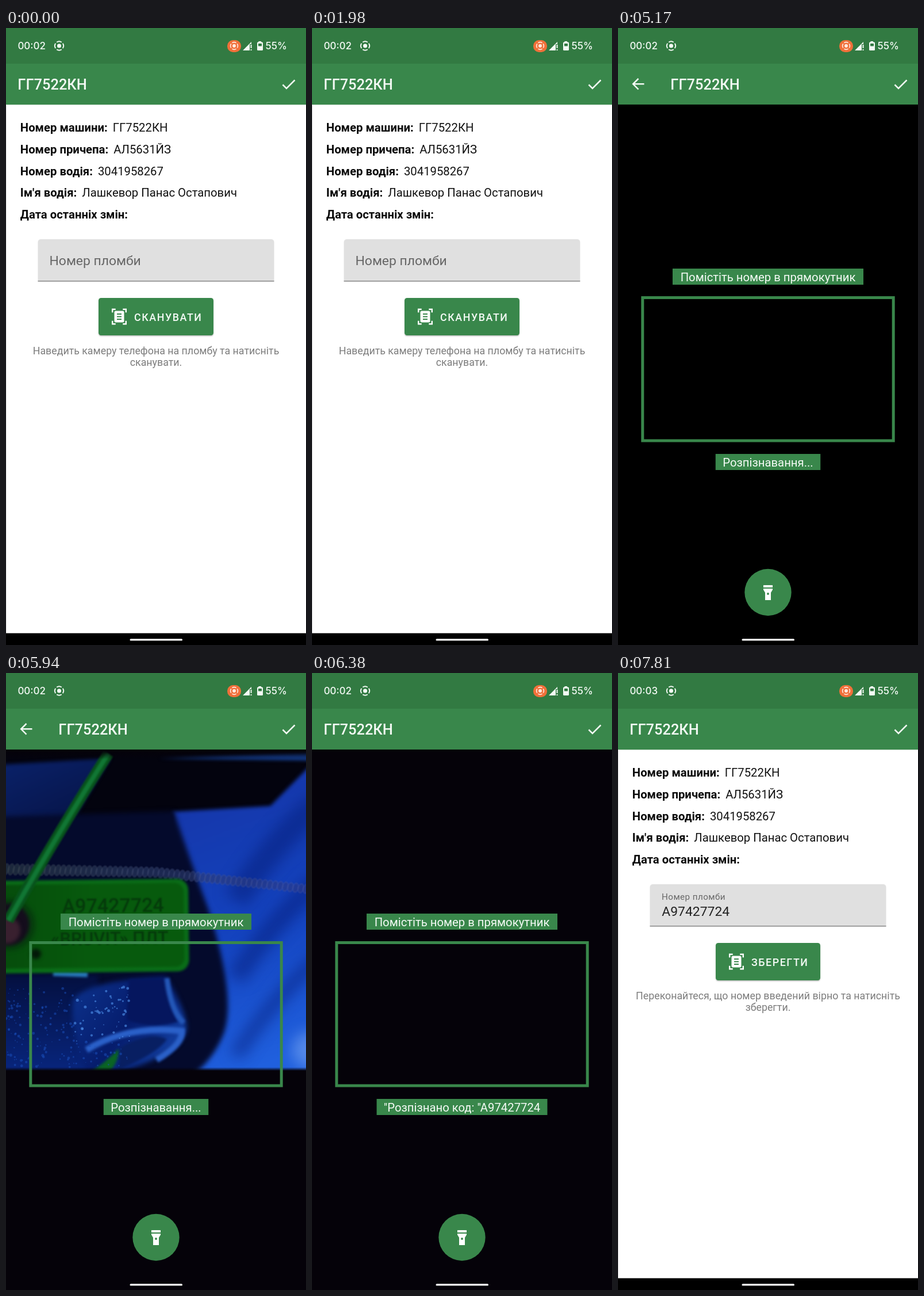
These frames come from a looping animation (522x1072 px, 8 s). An HTML page with a canvas:

```html
<!DOCTYPE html>
<html lang="uk">
<head>
<meta charset="utf-8">
<title>Сканування пломби</title>
<style>
html, body { margin: 0; width: 100%; height: 100%; overflow: hidden; background: #000; }
canvas { display: block; }
</style>
</head>
<body>
<canvas id="stage" width="522" height="1072"></canvas>
<script>
const W = 522, H = 1072, MID = W / 2;
const LOOP = 8000;
const GREEN = '#39874b';
const STATUS_GREEN = '#327a42';
const LIGHT = '#f4faf5';
const ROBOTO = 'Roboto, sans-serif';
let ctx = document.getElementById('stage').getContext('2d');

function rect(x, y, w, h, fill) {
  ctx.fillStyle = fill;
  ctx.fillRect(x, y, w, h);
}

function round(x, y, w, h, r, fill) {
  ctx.beginPath();
  ctx.roundRect(x, y, w, h, r);
  ctx.fillStyle = fill;
  ctx.fill();
}

function disc(x, y, r, fill) {
  ctx.beginPath();
  ctx.arc(x, y, r, 0, Math.PI * 2);
  ctx.fillStyle = fill;
  ctx.fill();
}

function shape(path, fill) {
  ctx.fillStyle = fill;
  ctx.fill(new Path2D(path));
}

function line(path, width, color) {
  ctx.lineWidth = width;
  ctx.strokeStyle = color;
  ctx.stroke(new Path2D(path));
}

function text(str, x, y, size, color, { weight = 400, align = 'left', spacing = 0, family = ROBOTO } = {}) {
  ctx.font = `${weight} ${size}px ${family}`;
  ctx.textAlign = align;
  ctx.letterSpacing = spacing + 'px';
  ctx.fillStyle = color;
  ctx.fillText(str, x, y);
  return x + ctx.measureText(str).width;
}

function gradient(x0, y0, x1, y1, ...colors) {
  const g = ctx.createLinearGradient(x0, y0, x1, y1);
  colors.forEach((c, i) => g.addColorStop(i / (colors.length - 1), c));
  return g;
}

function seeded(seed) {
  return () => (seed = seed * 16807 % 2147483647) / 2147483647;
}

function recordIcon(x, y, r, color) {
  disc(x, y, r * 0.42, color);
  ctx.strokeStyle = color;
  ctx.lineWidth = r * 0.23;
  for (let a = 0; a < 6; a += Math.PI / 2) {
    ctx.beginPath();
    ctx.arc(x, y, r * 0.9, a - 0.6, a + 0.6);
    ctx.stroke();
  }
}

function statusBar(clock) {
  const font = { weight: 500, family: 'Inter, sans-serif' };
  rect(0, 0, W, 62, STATUS_GREEN);
  text(clock, 20.4, 37, 17, LIGHT, font);
  recordIcon(92.5, 31, 8.4, LIGHT);
  round(385, 21, 24, 21, 10, '#f0703a');
  recordIcon(397, 31, 7, '#ffe9df');
  shape('M412 39 L427 24 V28 H424 V39 Z', LIGHT);
  rect(425.5, 29, 2, 6, LIGHT);
  rect(425.5, 37, 2, 2, LIGHT);
  rect(439.5, 23, 4.5, 3, LIGHT);
  round(437, 24.5, 10, 14.5, 1.5, LIGHT);
  rect(439, 27, 6, 4.5, STATUS_GREEN);
  text('55%', 451.5, 37, 17, LIGHT, font);
}

function appBar(withBack) {
  rect(0, 62, W, 71, GREEN);
  if (withBack) line('M45.5 97.3 H26.5 M35.5 88 L26.2 97.3 L35.5 106.6', 2.5, LIGHT);
  text('ГГ7522КН', withBack ? 91.3 : 20.3, 107, 25.4, LIGHT, { weight: 500 });
  line('M481.5 98.5 L488 105 L502.5 90.5', 2.5, LIGHT);
}

function scanIcon(cx, cy) {
  ctx.save();
  ctx.translate(cx, cy);
  for (const sx of [-1, 1]) {
    for (const sy of [-1, 1]) {
      line(`M${sx * 6.3} ${sy * 12.8} H${sx * 11.8} V${sy * 7.3}`, 2.4, '#fff');
    }
  }
  round(-8.5, -10, 17, 20, 2.5, '#fff');
  for (const y of [-4.5, 0, 4.5]) rect(-4, y - 1, 8, 2, GREEN);
  ctx.restore();
}

function button(label, w) {
  const x = MID - w / 2;
  ctx.save();
  ctx.shadowColor = 'rgba(0,0,0,.25)';
  ctx.shadowBlur = 2;
  ctx.shadowOffsetY = 1.5;
  round(x, 469, w, 65, 4.5, GREEN);
  ctx.restore();
  scanIcon(x + 36, 501.5);
  text(label, x + 62, 509, 17.8, LIGHT, { weight: 500, spacing: 1.59 });
}

const DETAILS = [
  ['Номер машини:', 'ГГ7522КН'],
  ['Номер причепа:', 'АЛ5631ЙЗ'],
  ['Номер водія:', '3041958267'],
  ["Ім'я водія:", 'Лашкевор Панас Остапович'],
  ['Дата останніх змін:', '']
];

function form(filled) {
  rect(0, 133, W, 919, '#fff');
  rect(0, 133, W, 1, '#cfe0d3');
  rect(0, 133, 1, 919, '#dcdcdc');
  rect(0, 1051.5, W, 21, '#000');
  DETAILS.forEach(([label, value], i) => {
    const y = 180.3 + i * 37.7;
    const end = text(label, 24.8, y, 20.3, '#0b0b0b', { weight: 700 });
    text(value, end + 9, y, 20.3, '#111');
  });

  round(55.5, 367, 411, 73.5, [5, 5, 0, 0], '#e0e0e0');
  rect(55.5, 439, 411, 1.5, '#8a8a8a');
  let hint;
  if (filled) {
    text('Номер пломби', 76, 394, 15.2, '#686868', { spacing: 0.45 });
    text('A97427724', 76.3, 421.8, 22.9, '#222');
    button('ЗБЕРЕГТИ', 182);
    hint = ['Переконайтеся, що номер введений вірно та натисніть', 'зберегти.'];
  } else {
    text('Номер пломби', 75.5, 411.8, 22.9, '#666');
    button('СКАНУВАТИ', 200);
    hint = ['Наведить камеру телефона на пломбу та натисніть', 'сканувати.'];
  }
  hint.forEach((s, i) => text(s, MID, 566.5 + i * 20.7, 17.8, '#7d7d7d', { align: 'center' }));
}

function blur(px) {
  ctx.filter = px ? `blur(${px}px)` : 'none';
}

function backdrop() {
  blur(3);
  rect(-20, 110, W + 40, 600, '#03030e');
  shape('M-20 160 L182 148 L60 350 H-20 Z', gradient(0, 155, 90, 340, '#0a2168', '#050f3c'));
  shape('M265 148 L540 138 V152 Z', '#143f92');
  shape('M290 241 L460 231 L540 150 V710 H290 Z',
    gradient(320, 240, 480, 670, '#1538ac', '#1443bf', '#2060de'));

  // Soft diagonal folds in the painted metal
  blur(12);
  for (let i = 0; i < 3; i++) {
    const y = 300 + i * 135;
    line(`M545 ${y - 75} Q460 ${y} 400 ${y + 95}`, 44 - i * 10, 'rgba(7,32,125,.55)');
  }
  disc(530, 655, 32, 'rgba(120,165,240,.6)');
  blur(4);
  shape('M-20 250 L292 240 Q322 330 352 410 Q405 575 375 635 Q355 680 310 710 H-20 Z', '#040a2c');
}

function bracket() {
  blur(4);
  rect(-20, 525, 180, 180, gradient(0, 525, 0, 690, '#041040', '#08257c'));
  shape('M116 570 Q135 535 278 527 Q316 590 314 620 Q300 665 190 695 H140 Q112 620 116 570 Z',
    gradient(116, 540, 310, 680, '#0c328c', '#061c6c', '#174bb4'));
  blur(2);
  shape('M214 532 H278 Q288 590 300 606 Q250 620 210 602 Z', '#05165e');
  line('M140 655 Q210 612 306 622 Q308 645 262 672', 11, '#2a60c8');
  line('M280 530 Q286 585 309 608', 9, '#2458b8');
  shape('M200 650 Q250 622 280 636 Q265 660 195 690 Z', '#081f62');
  shape('M145 695 Q175 675 196 653 Q197 676 178 695 Z', '#0a6424');
  line('M82 522 L142 524', 9, '#2878bc');

  blur(0);
  const rand = seeded(41);
  for (let i = 0; i < 220; i++) {
    const x = rand() * 215, y = 545 + rand() * 140, r = 0.6 + rand() * 2;
    const bright = x > 118 && y < 640;
    disc(x, y, r, bright ? 'rgba(75,140,230,.65)' : 'rgba(25,80,190,.5)');
  }
}

function rope() {
  blur(0.8);
  for (let x = 0; x < 530; x += 9) {
    const y = 341 + x * 0.02 + Math.max(0, x - 260) * 0.09;
    const warm = 1 - x / W;
    ctx.beginPath();
    ctx.ellipse(x, y, 5, 8 + warm * 2, 0.25, 0, Math.PI * 2);
    ctx.fillStyle = `rgba(45,60,${140 - warm * 70},.6)`;
    ctx.fill();
    ctx.strokeStyle = `rgba(100,112,${185 - warm * 75},.5)`;
    ctx.lineWidth = 1;
    ctx.stroke();
  }
}

function seal() {
  ctx.save();
  ctx.translate(0, 361);
  ctx.rotate(-0.012);
  blur(2);
  round(-30, 0, 347, 161, 20, '#0a6d18');
  round(-30, 7, 339, 146, 16, gradient(0, 0, 300, 0, '#064d0c', '#075a0d', '#075a0d'));
  blur(1);
  text('A97427724', 97, 57, 34, '#053a0b', { weight: 500 });
  text('«BRUVIT» ПЛТ', 77, 113, 31, '#053a0b', { weight: 500 });
  ctx.restore();

  blur(3);
  disc(6, 437, 46, '#063f0d');
  disc(4, 437, 37, '#140d1c');
  disc(2, 447, 23, '#39202f');
  disc(52, 488, 9, '#031708');
  blur(1.5);
  const rod = 'M178 140 Q100 262 4 430';
  line(rod, 19, '#08531c');
  line(rod, 8, '#117634');
}

function makePhoto() {
  const layer = document.createElement('canvas');
  layer.width = W;
  layer.height = H;
  const screen = ctx;
  ctx = layer.getContext('2d');
  ctx.beginPath();
  ctx.rect(0, 134, W, 557);
  ctx.clip();
  backdrop();
  bracket();
  rope();
  seal();
  blur(0);
  rect(0, 134, W, 16, gradient(0, 134, 0, 150, 'rgb(5,2,9)', 'rgba(5,2,9,0)'));
  rect(0, 685, W, 6, gradient(0, 685, 0, 691, 'rgba(5,2,9,0)', 'rgb(5,2,9)'));
  ctx = screen;
  return layer;
}

function tag(str, y, w) {
  rect(MID - w / 2, y, w, 28, GREEN);
  text(str, MID, y + 22, 20.3, LIGHT, { align: 'center' });
}

function scanner(live, showPhoto, found) {
  rect(0, 133, W, H - 133, live ? '#050209' : '#000');
  if (showPhoto) ctx.drawImage(photo, 0, 0);
  tag('Помістіть номер в прямокутник', 418, 332);
  ctx.strokeStyle = GREEN;
  ctx.lineWidth = 5;
  ctx.strokeRect(42.8, 468.5, 436.4, 248.5);
  if (found) tag('"Розпізнано код: "A97427724', 740, 297);
  else tag('Розпізнавання...', 740, 182.5);

  disc(MID, 980.5, 40.7, GREEN);
  rect(253, 968, 16, 4, '#fff');
  shape('M253 974 H269 V976 L266 981 V994 H256 V981 L253 976 Z', '#fff');
  disc(MID, 983, 1.9, GREEN);
}

function draw(t) {
  const live = t >= 5940;
  const closing = t >= 6380;
  const done = t >= 6490;
  if (t >= 5170 && !done) scanner(live, live && !closing, t >= 6270);
  else form(done);
  statusBar(t >= 7810 ? '00:03' : '00:02');
  appBar(t >= 5060 && !closing);
  round(215.5, 1061.3, 91.5, 3.3, 1.6, '#f5f5f5');
}

const photo = makePhoto();
const start = performance.now();
function tick() {
  draw((performance.now() - start) % LOOP);
  requestAnimationFrame(tick);
}
tick();
</script>
</body>
</html>
```
